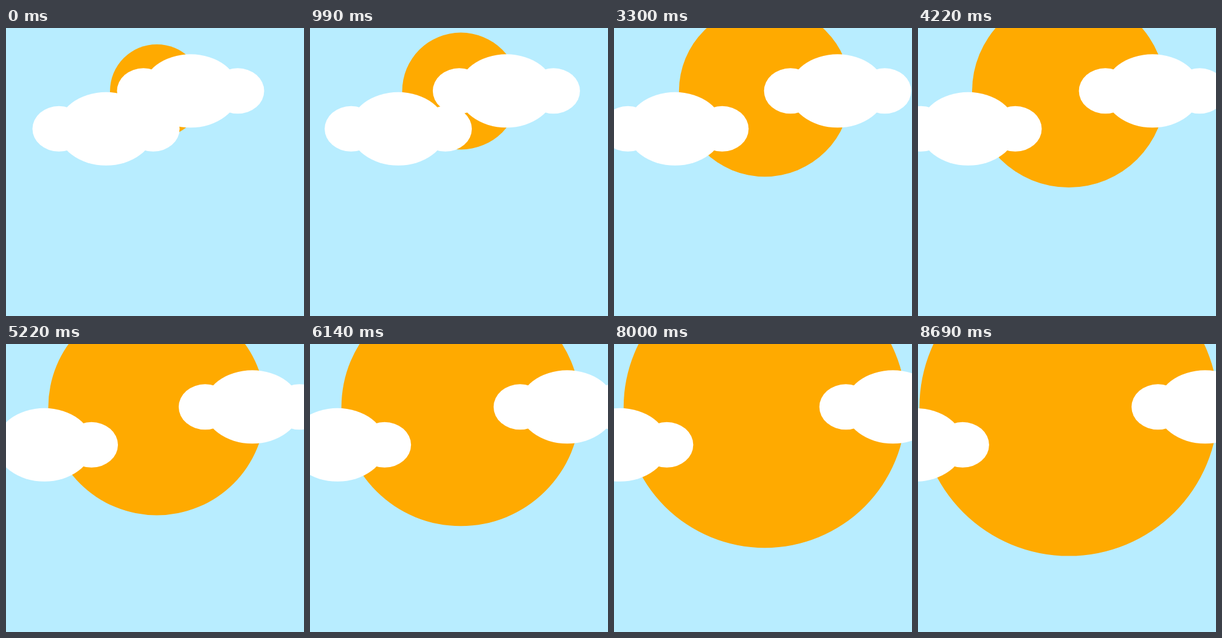
These frames come from a looping animation (490 by 475 pixels, 8.77 s). An HTML page with a canvas:

```html
<!DOCTYPE html>
<html lang="en">
<head>
<meta charset="utf-8">
<title>Sun behind clouds</title>
<style>
  html, body { margin: 0; width: 100%; height: 100%; overflow: hidden; background: #b8edff; }
  canvas { display: block; }
</style>
</head>
<body>
<canvas id="stage" width="490" height="475"></canvas>
<script>
const ctx = document.getElementById('stage').getContext('2d');
const LOOP = 8770, TICKS = 114, SPEED = 1.492; // pixels per tick

function ellipse(x, y, rx, ry, color) {
  ctx.fillStyle = color;
  ctx.beginPath();
  ctx.ellipse(x, y, rx, ry, 0, 0, 2 * Math.PI);
  ctx.fill();
}

function cloud(x, y) {
  ellipse(x - 77.5, y, 43.5, 37.5, '#fff');
  ellipse(x, y, 79.5, 60.5, '#fff');
  ellipse(x + 77.5, y, 43.5, 37.5, '#fff');
}

// The sun grows while the clouds part, all at the same stepped pace.
function draw(time) {
  const tick = Math.min(TICKS - 1, Math.floor((time + 24) * TICKS / LOOP));
  const d = tick * SPEED;
  ctx.fillStyle = '#b8edff';
  ctx.fillRect(0, 0, 490, 475);
  ellipse(248, 104, 77 + d, 77 + d, '#fa0');
  cloud(303.5 + d, 103.8);
  cloud(164.5 - d, 166.3);
}

const start = performance.now();
function loop() {
  draw((performance.now() - start) % LOOP);
  requestAnimationFrame(loop);
}
loop();
</script>
</body>
</html>
```
